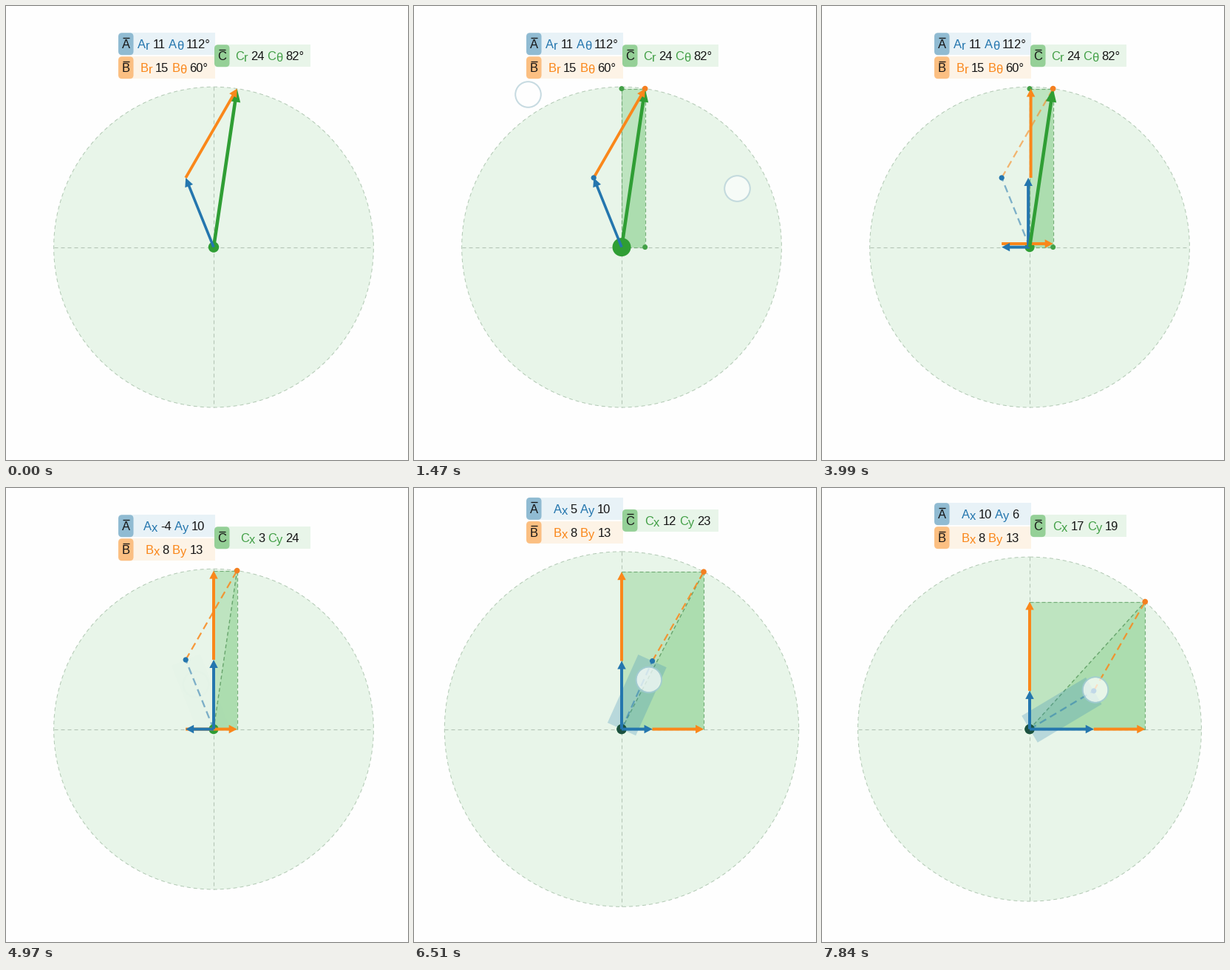
A matplotlib script that plays this animation: 544 px wide and 613 px high, repeating every 8000 ms.

```python
import numpy as np
import matplotlib.pyplot as plt
from matplotlib.animation import FuncAnimation
from matplotlib.patches import Circle, FancyBboxPatch, Polygon, Rectangle

W, H, DPI = 544, 613, 100
LOOP, STEP = 8000, 40
PT = 72 / DPI
UNIT = 9.1
BLUE, ORANGE, GREEN = "#2476ae", "#fa871a", "#2f9e34"
INK = "#161616"
O = np.array([281.0, 325.6])
FLIP = np.array([1, -1])

plt.rcParams["lines.scale_dashes"] = False
plt.rcParams["font.family"] = "Liberation Sans"
fig = plt.figure(figsize=(W / DPI, H / DPI), dpi=DPI, facecolor="#fefefe")
ax = fig.add_axes([0, 0, 1, 1])
ax.set_xlim(0, W)
ax.set_ylim(H, 0)
ax.axis("off")

parts = []
widths = {}


def ease(t, start, end):
    u = np.clip((t - start) / (end - start), 0, 1)
    return float(u * u * (3 - 2 * u))


def polar(length, deg):
    a = np.radians(deg)
    return length * np.array([np.cos(a), np.sin(a)])


def mix(a, b, k):
    return (1 - k) * a + k * b


def add(patch):
    parts.append(ax.add_patch(patch))


def line(p, q, color, lw, dash=None, alpha=1.0, z=3):
    if alpha <= 0:
        return
    style = (0, tuple(d * PT for d in dash)) if dash else "-"
    parts.extend(ax.plot([p[0], q[0]], [p[1], q[1]], color=color, lw=lw * PT,
                         ls=style, alpha=alpha, zorder=z,
                         dash_capstyle="butt", solid_capstyle="butt"))


def dot(p, r, color, alpha=1.0, z=4):
    if alpha > 0:
        add(Circle(p, r, fc=color, ec="none", alpha=alpha, zorder=z))


def shape(points, color, alpha, z=2):
    if alpha > 0:
        add(Polygon(points, fc=color, ec="none", alpha=alpha, zorder=z))


def arrow(p, q, color, lw, head, wide, alpha=1.0, z=5):
    """Shaft and head as one outline, so transparency stays even."""
    p, q = np.array(p), np.array(q)
    size = np.hypot(*(q - p))
    if size < 0.5 or alpha <= 0:
        return
    d = (q - p) / size
    n = np.array([-d[1], d[0]])
    k = min(1, size / head)
    neck = q - d * head * k
    a, b = n * lw / 2 * k, n * wide / 2 * k
    shape([p + a, neck + a, neck + b, q, neck - b, neck - a, p - a],
          color, alpha, z)


def touch(p, alpha, fill, edge):
    if alpha <= 0:
        return
    add(Circle(p, 16.5, fc="white", ec="none", alpha=alpha * fill, zorder=9))
    add(Circle(p, 17.3, fc="none", ec=edge, lw=2 * PT,
               alpha=alpha * 0.8, zorder=9))


def word(x, y, s, color, size=16.5, **kw):
    t = ax.text(x, y, s, color=color, fontsize=size * PT, va="baseline",
                zorder=8, **kw)
    parts.append(t)
    return t


def label(x, y, width, name, color, tag, panel, subs, values):
    add(Rectangle((x + 16, y - 15), width - 16, 30, fc=panel, ec="none", zorder=6))
    add(FancyBboxPatch((x + 5, y - 10), 10.5, 20, fc=tag, ec="none",
                       boxstyle="round,pad=5,rounding_size=5", zorder=7))
    word(x + 10.2, y + 6, name, INK, ha="center")
    line((x + 6, y - 8.5), (x + 14.5, y - 8.5), INK, 1.3, z=8)

    runs = []
    for sub, value in zip(subs, values):
        runs += [(name, color, 0, 0), (sub, color, 2, 4), (value, INK, 0, 4)]
    texts = []
    for s, c, drop, gap in runs:
        t = word(0, y + 6 + drop, s, c)
        if s not in widths:
            widths[s] = t.get_window_extent().width
        texts.append((t, widths[s], gap))
    total = sum(w + g for _, w, g in texts) - texts[-1][2]
    left = x + 20 + (width - 20) / 2 - total / 2
    for t, w, gap in texts:
        t.set_x(left)
        left += w + gap


def readout(v, cartesian):
    if cartesian:
        return "xy", [str(int(round(c / UNIT))) for c in v]
    angle = np.degrees(np.arctan2(v[1], v[0]))
    return "rθ", [f"{np.hypot(*v) / UNIT:.0f}", f"{angle:.0f}°"]


def stage(radius):
    add(Circle(O, radius, fc="#e8f5e9", ec="none", zorder=0))
    add(Circle(O, radius, fc="none", ec="#b2c9b4", lw=PT,
               ls=(0, (5 * PT, 4 * PT)), zorder=1))
    for d in ([radius, 0], [0, radius]):
        line(O - d, O + d, "#b4c5b6", 1.1, (5, 4), z=1)


def projection(tip, alpha, dots):
    foot, top = np.array([tip[0], O[1]]), np.array([O[0], tip[1]])
    shape([O, top, tip, foot], "#43b548", 0.25 * alpha)
    shape([O, tip, foot], "#43b548", 0.14 * alpha)
    for p, q in ((top, tip), (foot, tip), (O, top), (O, foot)):
        line(p, q, "#75ae79", 1.2, (5, 3), alpha)
    for p in (top, foot):
        dot(p, 3.5, "#43a047", dots)


def components(tip_a, tip, slide, alpha):
    y_bx = mix(tip_a[1], O[1], slide)
    x_ay = mix(tip_a[0], O[0], slide)
    x_by = mix(tip[0], O[0], slide)
    look = (4, 11, 11.5, alpha)
    arrow((tip_a[0], y_bx), (tip[0], y_bx), ORANGE, *look)
    arrow(O, (tip_a[0], O[1]), BLUE, *look)
    arrow((x_by, tip_a[1]), (x_by, tip[1]), ORANGE, *look)
    arrow((x_ay, O[1]), (x_ay, tip_a[1]), BLUE, *look)


def draw(i):
    while parts:
        parts.pop().remove()
    t = (i + 0.5) * STEP

    angle = np.interp(t, [5150, 5400, 5810, 6450, 7140, 7840],
                      [112, 103, 86.5, 67, 49.2, 30.8])
    a, b = polar(101, angle), polar(139, 60)
    c = a + b
    tip_a, tip = O + a * FLIP, O + c * FLIP
    radius = np.hypot(*c)

    shown = ease(t, 500, 1200)
    split = ease(t, 1750, 2500)
    slide = ease(t, 3080, 4120)
    dashed = ease(t, 2750, 3700)
    c_dashed = ease(t, 4300, 4900)
    drag = ease(t, 4950, 5250)

    stage(radius)
    projection(tip, shown, shown * (1 - c_dashed))

    # dashed stand-ins for the vectors
    line(O, tip, "#68a56d", 1.4, (5, 3.5), c_dashed)
    line(O, tip_a, BLUE, 2.3, (10, 6), 0.55 * dashed, z=4)
    line(tip_a, tip, ORANGE, 2.2, (10, 6),
         (0.6 + 0.25 * c_dashed) * dashed, z=4)

    if drag:
        n = 21 * a[::-1] / np.hypot(*a)
        shape([O - n, tip_a - n, tip_a + n, O + n], "#3d8fb8", 0.28 * drag, 4)

    pulse = ease(t, 900, 1350) * (1 - ease(t, 1550, 2100))
    dot(O, 7.2 + 5.3 * pulse - 0.6 * dashed, GREEN)
    dot(O, 6.7, "#1c5040", drag, 4.5)

    components(tip_a, tip, slide, split * (0.5 + 0.5 * dashed))

    arrow(O, tip, GREEN, 4.6, 18, 14.5, 1 - c_dashed, 6)
    arrow(O, tip_a, BLUE, 3.6, 12, 11.5, 1 - dashed, 6)
    arrow(tip_a, tip, ORANGE, 3.8, 11, 11.5, 1 - dashed, 6)
    dot(tip_a, 3.6, BLUE, shown, 6)
    dot(tip, 3.8, "#f47f20", shown, 6)

    taps = ease(t, 1100, 1400) * (1 - ease(t, 1480, 1800))
    touch((154.5, 119.5), taps, 0.3, "#b9d2da")
    touch((437.5, 246.5), taps, 0.65, "#b9d2da")
    times = [5150, 5810, 7140, 7840]
    finger = (np.interp(t, times, [257, 288.5, 345, 370]),
              np.interp(t, times, [265, 255.5, 262, 272.5]))
    touch(finger, drag, 0.72, "#a3cbd6")

    top = O[1] - radius
    cart = t >= 4600
    label(152, top - 58, 131, "A", BLUE, "#90bbd2", "#e8f2f7", *readout(a, cart))
    label(152, top - 26, 131, "B", ORANGE, "#fbbf82", "#fdf3e6", *readout(b, cart))
    label(282, top - 42, 129.5, "C", "#43a047", "#95d097", "#e8f5e9",
          *readout(c, cart))
    return parts


anim = FuncAnimation(fig, draw, frames=LOOP // STEP, interval=STEP,
                     init_func=lambda: [], repeat=True, repeat_delay=0,
                     blit=False)
plt.show()
```
